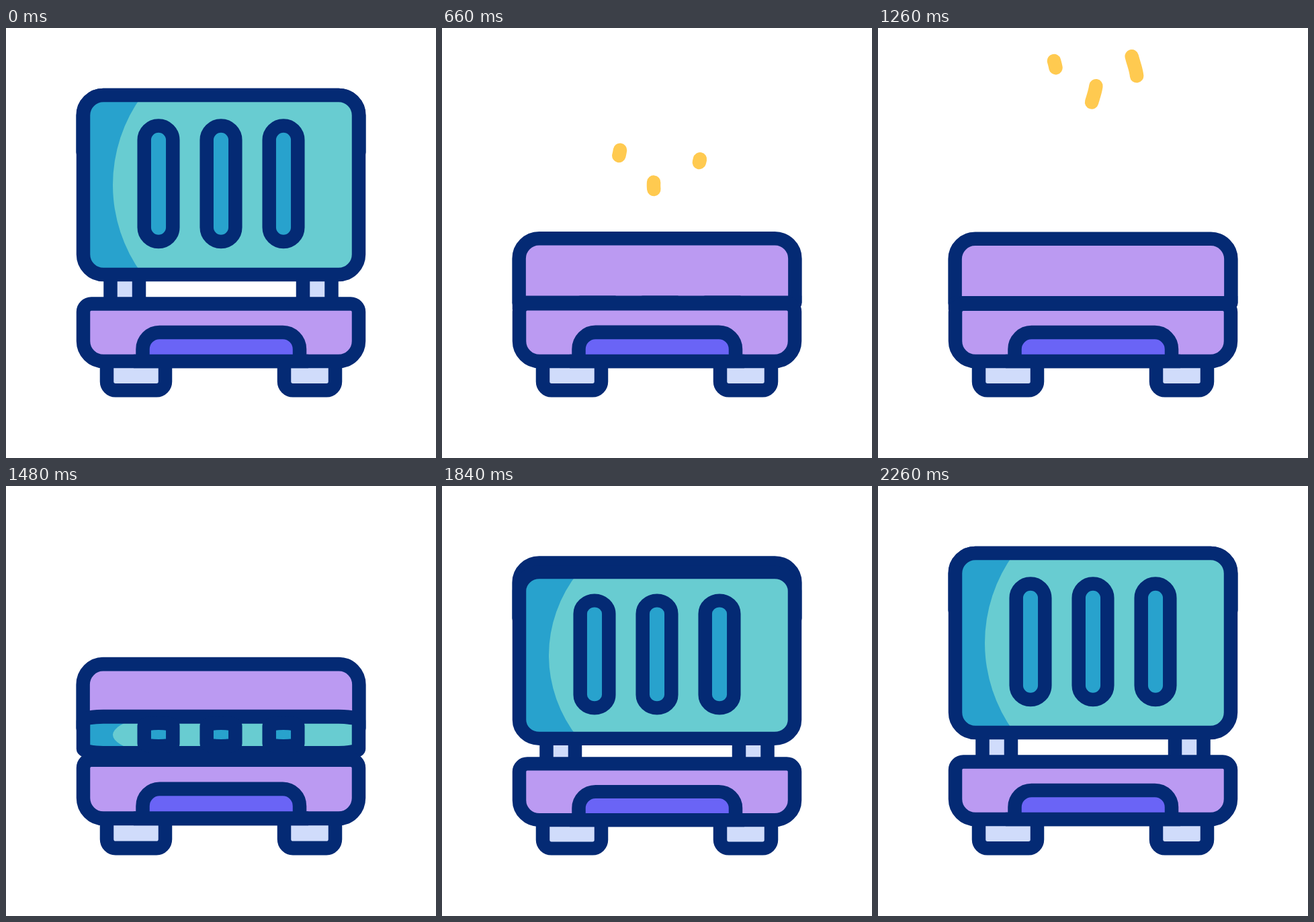
An HTML page that plays this animation: 640 by 640 pixels, repeating every 2460 ms.

```html
<!DOCTYPE html>
<html lang="en">
<head>
<meta charset="utf-8">
<title>Sandwich maker</title>
<style>
  html, body { margin: 0; width: 100%; height: 100%; overflow: hidden; background: #fff; }
  svg { display: block; width: 100vw; height: 100vh; }
  .line { stroke: #042a74; stroke-width: 20.5; }
  .purple { fill: #bb9af2; }
  .violet { fill: #6a64f6; }
  .pale { fill: #d0dcfb; }
  .teal { fill: #68ccd1; }
  .blue { fill: #28a2cd; }
  .hollow { fill: none; }
  .steam { fill: none; stroke: #ffca50; stroke-width: 20.5; stroke-linecap: round; stroke-linejoin: round; }
</style>
</head>
<body>
<svg viewBox="0 0 640 640">
  <g id="steam"></g>
  <g id="machine">
    <g id="legs"></g>
    <path class="line pale" d="M150 496V526.3a13 13 0 0 0 13 13H224a13 13 0 0 0 13-13V496"/>
    <path class="line pale" d="M414 496V526.3a13 13 0 0 0 13 13H477a13 13 0 0 0 13-13V496"/>
    <path id="back" class="line purple" stroke-linecap="round"/>
    <rect id="plate" class="teal" x="115" width="410" rx="30"/>
    <path id="shade" class="blue"/>
    <rect id="rim" class="line hollow" x="115" width="410" rx="30"/>
    <g id="slots"></g>
    <path class="line purple" d="M127 410.5H513a12 12 0 0 1 12 12V466a30 30 0 0 1-30 30H145a30 30 0 0 1-30-30V422.5a12 12 0 0 1 12-12Z"/>
    <path class="line violet" d="M203.5 496V478a25 25 0 0 1 25-25H412a25 25 0 0 1 25 25V496"/>
    <path class="line hollow" d="M190 496H450"/>
  </g>
</svg>
<script>
const LOOP = 2460, STEP = 20, FLOOR = 549.5;
const $ = id => document.getElementById(id);

// Tables of [time, value], eased between neighbours
const STRETCH = [[150, 1], [400, 1.031], [940, 0.968], [1300, 1], [1600, 1.034], [1920, 0.969], [2265, 1]];
const CLOSED = [[235, 0], [460, 1], [1400, 1], [1680, 0]];
const NUDGE = [[1680, 0], [2000, 1], [2265, 0]];

// Each wisp climbs from one height to another; the tail follows the head
const WISPS = [
  { x: 260.5, crest: 122, from: 190, to: 49, head: [560, 1240], tail: [700, 1370] },
  { x: 320, crest: 130, from: 240, to: 85, head: [540, 1300], tail: [740, 1440] },
  { x: 380.5, crest: 130, from: 200, to: 32, head: [580, 1380], tail: [780, 1480] }
];

const mix = (a, b, k) => a + (b - a) * k;

function ease(t, start, end) {
  const k = Math.min(1, Math.max(0, (t - start) / (end - start)));
  return k * k * (3 - 2 * k);
}

function track(keys, t) {
  let value = keys[0][1];
  for (let i = 1; i < keys.length; i++) {
    const [a, from] = keys[i - 1], [b, to] = keys[i];
    if (t >= a) value = mix(from, to, ease(t, a, b));
  }
  return value;
}

function add(parent, tag, attrs) {
  const el = document.createElementNS("http://www.w3.org/2000/svg", tag);
  set(el, attrs);
  return $(parent).appendChild(el);
}

function set(el, attrs) {
  for (const name in attrs) el.setAttribute(name, attrs[name]);
}

const legs = [155.5, 442].map(x => add("legs", "rect", { class: "line pale", x, width: 42.5 }));
const slots = [227, 320, 413].map(x =>
  add("slots", "rect", { class: "line blue", x: x - 21.3, width: 42.6, rx: 21.3 }));
const wisps = WISPS.map(() => add("steam", "path", { class: "steam" }));

function drawLid(p, n) {
  const top = mix(100, 409, p) + 38.6 * n;
  const bottom = mix(367, 409, p) + 10.3 * n;
  const height = Math.max(0.01, bottom - top), k = height / 267;

  set($("plate"), { y: top, height, ry: 30 * k });
  set($("rim"), { y: top, height, ry: 30 * k });
  set($("shade"), { d: `M203 ${top}H145A30 ${30 * k} 0 0 0 115 ${top + 30 * k}V${bottom - 30 * k}` +
    `A30 ${30 * k} 0 0 0 145 ${bottom}H203A224.5 ${224.5 * k} 0 0 1 203 ${top}Z` });
  for (const el of slots) set(el, { y: top + 45.5 * k, height: 172.5 * k, ry: 21.3 * k });
  for (const el of legs) set(el, { y: bottom - 4, height: 420 - bottom });

  const backTop = mix(100, 313.6, p) + 10 * n;
  const backEnd = mix(185, 409, p) + 9 * n;
  set($("back"), { d: `M114.6 ${backEnd}V${backTop + 30}a30 30 0 0 1 30-30H495.4a30 30 0 0 1 30 30V${backEnd}` });
}

function drawWisp(el, w, t) {
  const head = mix(w.from, w.to, ease(t, ...w.head));
  const tail = mix(w.from, w.to, ease(t, ...w.tail));
  if (tail - head < 0.5) return set(el, { d: "" });
  const points = [];
  for (let i = 0; i <= 24; i++) {
    const y = mix(head, tail, i / 24);
    points.push(`${w.x - 5 * Math.cos(Math.PI * (y - w.crest) / 52)} ${y}`);
  }
  set(el, { d: "M" + points.join("L") });
}

function draw(t) {
  const s = track(STRETCH, t);
  set($("machine"), { transform: `translate(0 ${FLOOR * (1 - s)}) scale(1 ${s})` });
  drawLid(track(CLOSED, t), track(NUDGE, t));
  wisps.forEach((el, i) => drawWisp(el, WISPS[i], t));
}

const began = performance.now();
function tick() {
  const t = (performance.now() - began) % LOOP;
  draw(Math.floor(t / STEP) * STEP);
  requestAnimationFrame(tick);
}
tick();
</script>
</body>
</html>
```
